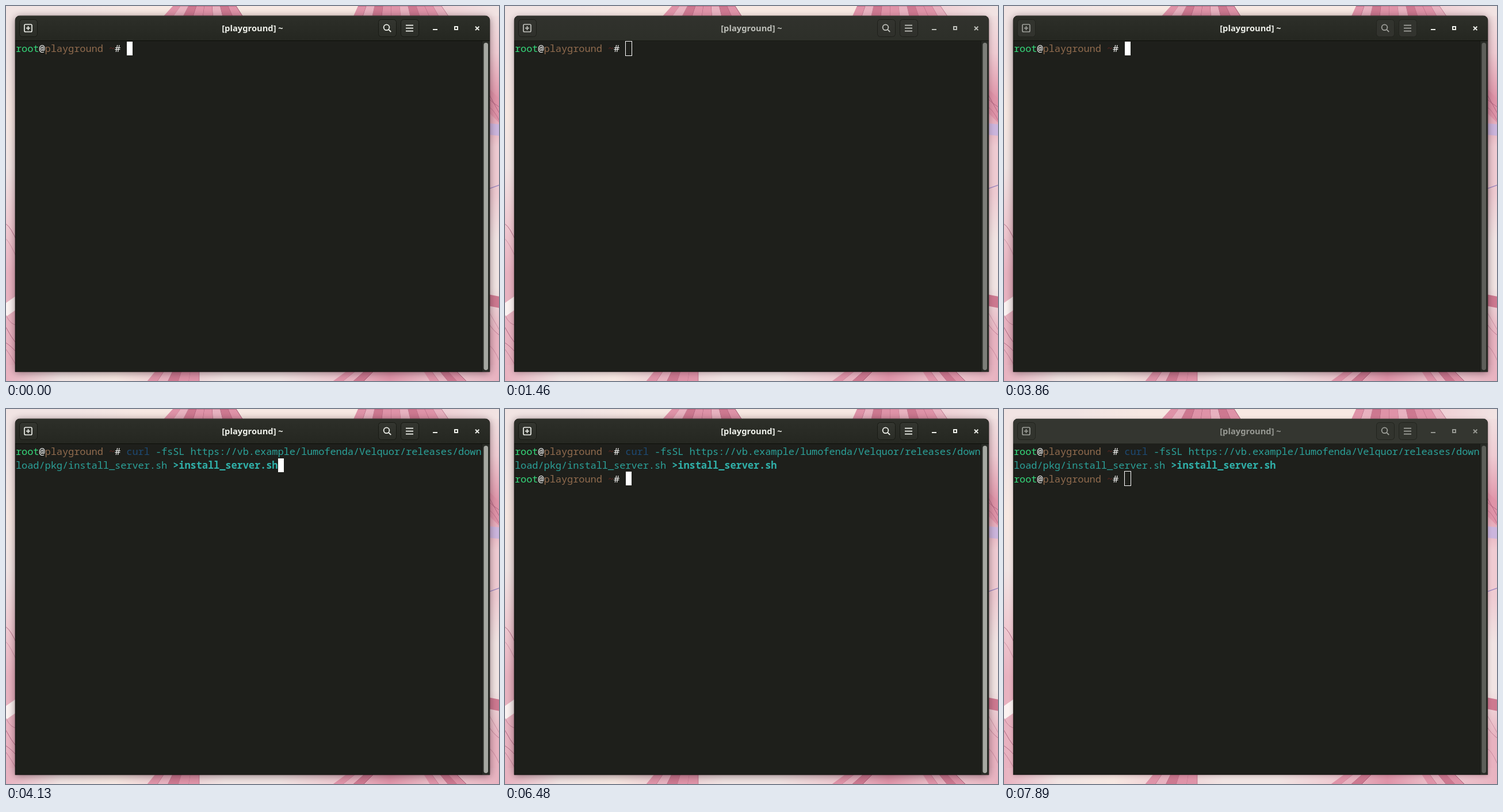
These frames come from a looping animation (857x653 px, 8 s). An HTML page with a canvas:

```html
<!DOCTYPE html>
<html lang="en">
<head>
<meta charset="utf-8">
<title>Terminal</title>
<style>
html, body { margin: 0; width: 100%; height: 100%; overflow: hidden; background: #f2dfe1; }
canvas { display: block; width: 857px; height: 653px; }
</style>
</head>
<body>
<canvas id="stage" width="857" height="653"></canvas>
<script>
const W = 857, H = 653, LOOP = 8000;
const BLUR = 1400, FOCUS = 3860, PASTE = 4100, ENTER = 5100, RUN = 5130, DONE = 6480, BLUR2 = 7680;
const CELL = 10.12, ROW = 23.92, LEFT = 17, TOP = 61.6;
const WIN = { x: 16, y: 17, w: 825, h: 620, bar: 43 };
const MONO = '17.1px "Noto Sans Mono", "DejaVu Sans Mono", monospace';
const TITLE = '600 14.72px "Noto Sans", "Open Sans", sans-serif';
const TEAL = '#2ba199', BRIGHT = 238, DIM = 150;

const ctx = document.getElementById('stage').getContext('2d');

const clamp = v => Math.min(1, Math.max(0, v));
const ease = v => 1 - (1 - clamp(v)) ** 2;
const lerp = (a, b, p) => a + (b - a) * p;

// Grey with the window theme's slight olive tint
function tone(from, to, p) {
  const v = lerp(from, to, p);
  return `rgb(${v},${v + 1.5},${v - 4})`;
}

// Linear gradient through evenly spaced colours
function blend(g, x0, y0, x1, y1, ...colors) {
  const fill = g.createLinearGradient(x0, y0, x1, y1);
  colors.forEach((c, i) => fill.addColorStop(i / (colors.length - 1), c));
  return fill;
}

function roundRect(x, y, w, h, r) {
  ctx.beginPath();
  ctx.roundRect(x, y, w, h, r);
}

function random(seed) {
  return () => (seed = seed * 16807 % 2147483647) / 2147483647;
}

// Soft pink wallpaper, painted once
function makeWallpaper() {
  const canvas = document.createElement('canvas');
  canvas.width = W;
  canvas.height = H;
  const g = canvas.getContext('2d');
  const rnd = random(41);
  const cream = '#f7e8e2', pale = '#f1e4e3', blush = '#efcbd2', pink = '#e8b2c0', rose = '#df93a8', deep = '#cd7890';
  const bands = [rose, pink, deep, rose];

  // A lock of hair: bands that lean and spread from y to y + 22
  function lock(x, width, lean, spread, y) {
    const n = Math.round(width / 14);
    const top = i => x + width * i / n;
    const foot = i => x + lean + (width + spread) * i / n;
    for (let i = 0; i < n; i++) {
      g.beginPath();
      g.moveTo(top(i), y);
      g.lineTo(top(i + 1), y);
      g.lineTo(foot(i + 1), y + 22);
      g.lineTo(foot(i), y + 22);
      g.fillStyle = bands[i % bands.length];
      g.fill();
      g.strokeStyle = `rgba(150,70,100,${.4 + rnd() * .5})`;
      g.stroke();
    }
  }

  // Thin strands crossing a side margin
  function strands(x, y0, y1, n) {
    for (let i = 0; i < n; i++) {
      const y = lerp(y0, y1, (i + rnd()) / n);
      g.beginPath();
      g.moveTo(x, y);
      g.quadraticCurveTo(x + 8, y + 18 * rnd(), x + 20, y + 14 + 24 * rnd());
      g.strokeStyle = `rgba(160,85,115,${.4 + rnd() * .4})`;
      g.stroke();
    }
  }

  function ribbon(x, y, lean, height, color) {
    g.beginPath();
    g.moveTo(x, y);
    g.lineTo(x + 20, y + lean);
    g.lineTo(x + 20, y + lean + height);
    g.lineTo(x, y + height);
    g.fillStyle = color;
    g.fill();
  }

  g.fillStyle = blend(g, 0, 0, W, 0, pale, pale, cream, cream, cream, cream, blush, pale);
  g.fillRect(0, 0, W, 30);
  g.fillStyle = blend(g, 0, 0, 0, H, pale, pale, cream, pale, blush, pink, pink, pink);
  g.fillRect(0, 17, 30, H);
  g.fillStyle = blend(g, 0, 0, 0, H, pale, blush, rose, blush, blush, pale, pale, pink, pink);
  g.fillRect(820, 17, 37, H);
  g.fillStyle = blend(g, 0, 0, W, 0, pink, pale, cream, blush, pale, pale, blush, rose, blush, pink);
  g.fillRect(0, 625, W, 28);

  lock(290, 110, -20, 34, 0);
  lock(612, 145, -10, 25, 0);
  lock(262, 74, -18, 18, 633);
  lock(596, 46, -30, 8, 633);
  lock(724, 56, 14, 8, 633);
  ribbon(0, 517, -14, 24, '#fbf2f1');
  ribbon(838, 142, 20, 42, rose);
  ribbon(838, 204, 2, 20, '#cbb5dd');
  ribbon(838, 502, 4, 20, deep);
  ribbon(838, 318, -7, 1.5, '#9c88c0');
  strands(0, 370, 430, 2);
  strands(0, 525, 610, 4);
  strands(838, 138, 190, 3);
  strands(838, 500, 600, 3);
  return canvas;
}
const wallpaper = makeWallpaper();

function drawFrame(b) {
  const { x, y, w, h, bar } = WIN;
  ctx.drawImage(wallpaper, 0, 0);
  ctx.save();
  ctx.shadowColor = `rgba(40,15,25,${lerp(.5, .22, b)})`;
  ctx.shadowBlur = lerp(14, 9, b);
  ctx.shadowOffsetY = 2;
  ctx.fillStyle = '#1e1f1b';
  roundRect(x, y, w, h, [8, 8, 0, 0]);
  ctx.fill();
  ctx.restore();

  ctx.strokeStyle = `rgba(15,12,12,${lerp(.6, .3, b)})`;
  ctx.lineWidth = 1;
  ctx.stroke();

  ctx.save();
  ctx.clip();
  ctx.fillStyle = blend(ctx, 0, y, 0, y + bar, tone(45, 52, b), tone(37, 52, b));
  ctx.fillRect(x, y, w, bar);
  ctx.fillStyle = tone(58, 62, b);
  ctx.fillRect(x, y, w, 1);
  ctx.fillStyle = tone(13, 30, b);
  ctx.fillRect(x, y + bar, w, 1);
  ctx.restore();
}

function drawButton(x, d) {
  roundRect(x + .5, 23.5, 31, 30, 5);
  ctx.fillStyle = blend(ctx, 0, 23, 0, 54, tone(52, 50, d), tone(43, 50, d));
  ctx.fill();
  ctx.strokeStyle = tone(24, 34, d);
  ctx.lineWidth = 1;
  ctx.stroke();
}

function drawHeader(b, d, title) {
  [23, 647, 686].forEach(x => drawButton(x, d));

  // New tab, search and menu icons
  ctx.strokeStyle = ctx.fillStyle = tone(BRIGHT, DIM + 8, d);
  ctx.lineWidth = 1.7;
  roundRect(32, 32, 13, 13, 2);
  ctx.stroke();
  ctx.fillRect(35, 37.7, 7, 1.7);
  ctx.fillRect(37.7, 35, 1.7, 7);
  ctx.lineWidth = 1.8;
  ctx.beginPath();
  ctx.arc(661.5, 37.3, 4.9, 0, 7);
  ctx.moveTo(665, 40.8);
  ctx.lineTo(669.2, 45);
  ctx.stroke();
  for (let i = 0; i < 3; i++) ctx.fillRect(695, 32.7 + i * 5, 13, 1.8);

  // Window controls
  ctx.fillStyle = ctx.strokeStyle = tone(BRIGHT, DIM, b);
  ctx.lineWidth = 2;
  ctx.fillRect(742, 40, 8, 2);
  ctx.strokeRect(780, 36, 5, 5);
  ctx.beginPath();
  for (const s of [-3.2, 3.2]) {
    ctx.moveTo(819.2 - s, 35.7);
    ctx.lineTo(819.2 + s, 42.1);
  }
  ctx.stroke();

  ctx.font = TITLE;
  ctx.textAlign = 'center';
  ctx.fillText(title, W / 2, 44);
  ctx.textAlign = 'left';
}

function drawScrollbar(d) {
  ctx.fillStyle = '#292b26';
  ctx.fillRect(828, 61, 13, 576);
  ctx.fillStyle = '#181915';
  ctx.fillRect(827, 61, 1, 576);
  ctx.fillStyle = tone(166, 93, d);
  roundRect(830.5, 64, 7.5, 570, 3.75);
  ctx.fill();
}

// One glyph per terminal cell
function write(row, col, text, color, weight = '') {
  ctx.font = `${weight} ${MONO}`;
  ctx.fillStyle = color;
  [...text].forEach((ch, i) => ctx.fillText(ch, LEFT + (col + i) * CELL, TOP + 18.3 + row * ROW));
}

function prompt(row) {
  write(row, 0, 'root', '#35d97b');
  write(row, 4, '@', '#fff');
  write(row, 5, 'playground', '#906b4e');
  write(row, 16, '~', '#5b2620');
  write(row, 17, '#', '#f4f4f2');
}

function command() {
  write(0, 19, 'curl', '#1d4a74');
  write(0, 24, '-fsSL https://vb.example/lumofenda/Velquor/releases/down', TEAL);
  write(1, 0, 'load/pkg/install_server.sh', TEAL);
  write(1, 27, '>install_server.sh', '#30b0a9', 'bold');
}

function cursor(row, col, hollow) {
  const x = Math.ceil(LEFT + col * CELL), y = Math.round(TOP + row * ROW);
  ctx.fillStyle = ctx.strokeStyle = '#fff';
  ctx.lineWidth = 1;
  if (hollow) ctx.strokeRect(x - .5, y - .5, 11, 25);
  else ctx.fillRect(x, y, 10, 24);
}

function draw(t) {
  const away = (t >= BLUR && t < FOCUS) || t >= BLUR2;
  // Focus returns to the header at once; buttons and scrollbar fade back.
  const b = away ? ease((t - (t < FOCUS ? BLUR : BLUR2)) / 180) : 0;
  const d = away ? b : t >= FOCUS ? 1 - ease((t - FOCUS) / 200) : 0;
  const running = t >= RUN && t < DONE;

  drawFrame(b);
  drawHeader(b, d, running ? '[playground] curl -fsSL https://v ~' : '[playground] ~');
  drawScrollbar(d);

  prompt(0);
  if (t >= PASTE) command();
  if (t >= DONE) prompt(2);

  if (t < PASTE) cursor(0, 19, away);
  else if (t < ENTER) cursor(1, 45, away);
  else cursor(2, t < DONE ? 0 : 19, away);
}

const start = performance.now();
function tick() {
  draw((performance.now() - start) % LOOP);
  requestAnimationFrame(tick);
}
tick();
</script>
</body>
</html>
```
